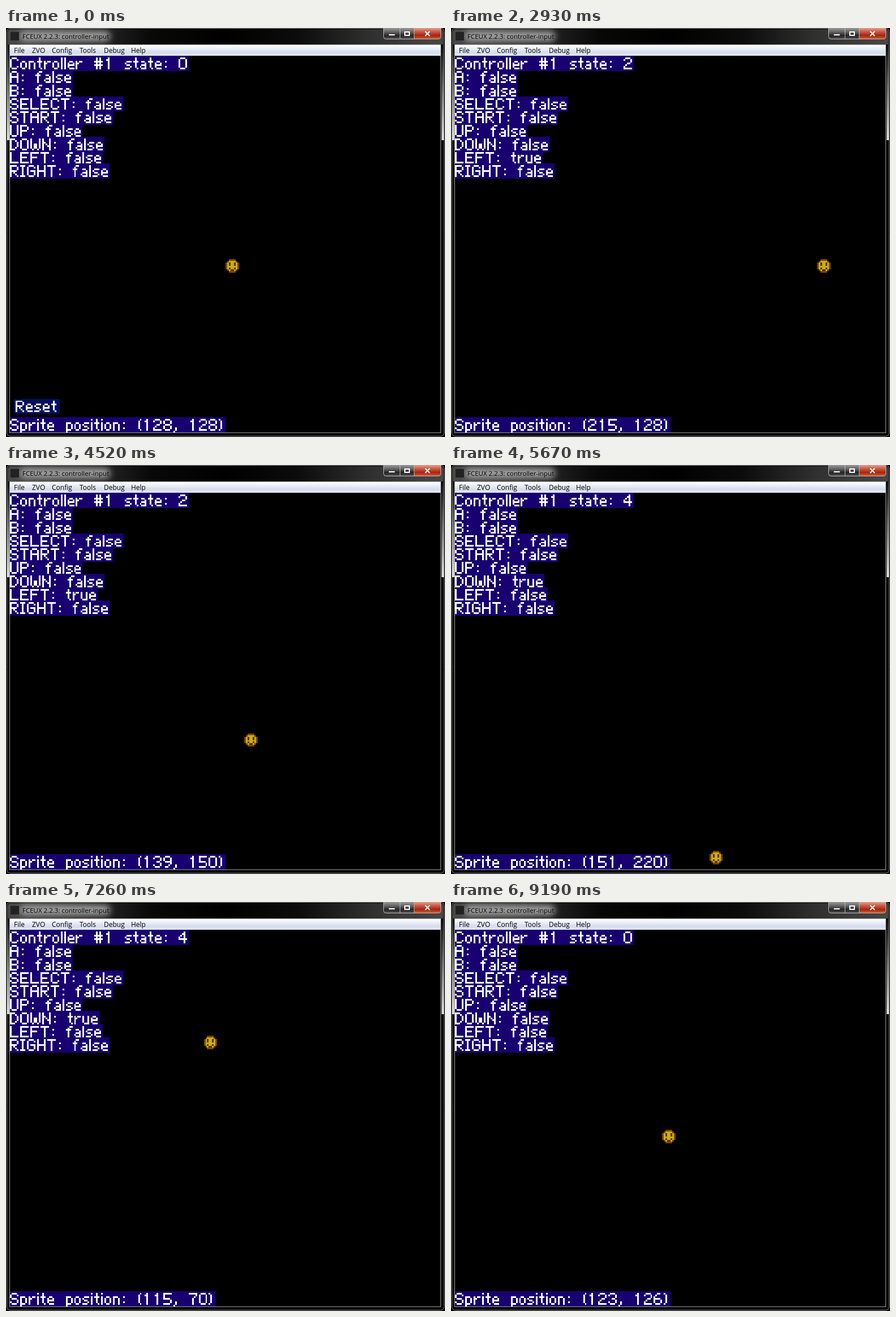
These frames come from a looping animation (776 by 722 pixels, 9220 ms). An HTML page with a canvas:

```html
<!DOCTYPE html>
<html lang="en">
<meta charset="utf-8">
<title>Controller input</title>
<style>
html, body { margin: 0; width: 100%; height: 100%; overflow: hidden; background: #000 }
canvas { display: block }
</style>
<canvas id="stage" width="776" height="722"></canvas>
<script>
const ctx = document.getElementById('stage').getContext('2d');
const LOOP = 9220, RIGHT = 1, LEFT = 2, DOWN = 4, UP = 8;

// Key presses: button, pressed at, released at (ms); the sprite moves 1 unit per 15 ms
const presses = [
  [LEFT, 395, 3890], [UP, 3860, 3920], [DOWN, 3920, 4310], [LEFT, 4340, 4610],
  [DOWN, 4620, 8340], [RIGHT, 4800, 5070], [LEFT, 6490, 7030],
  [RIGHT, 8000, 8555], [UP, 8610, 8850], [LEFT, 8740, 9175]
];

// Console letters: each word is a polyline through x,y grid points
const strokes = {
  A: '0601103041 4146 0343', B: '0006 0030 0333 0636 4142 4445',
  C: '4130100105163645', D: '002031424435260600', E: '40000646 0333',
  F: '400006 0333', G: '41301001051636454323', H: '0006 4046 0343',
  I: '0020 1016 0626', L: '000646', N: '0006 4046 1234',
  O: '103041453616050110', P: '06003041423303', R: '06003041423303 2446',
  S: '413010010213334445361605', T: '0040 2026', U: '000516364540',
  W: '00051625233335465550',
  a: '1222333616051434', e: '043433221203051636', f: '30201116 0222',
  i: '0000 0206', l: '0006', n: '0602223336', o: '122233352616050312',
  p: '07022233352606', r: '0206 132232', s: '3212031424352606',
  t: '101526 0222', u: '0205163632',
  '#': '1016 3036 0242 0444', ':': '1212 1515', ',': '151607',
  '(': '20111526', ')': '00111506',
  0: '103041453616050110', 1: '112026', 2: '0110304142332314050646',
  3: '01103041423323 334445361605', 4: '3630030444', 5: '4000033344453606',
  6: '30200205163645443303', 7: '0040412326',
  8: '103041423313020110 3344453616050413', 9: '4313020110304144352616'
};

const advance = c => c === 'W' ? 7 : 'il'.includes(c) ? 2 : ':,'.includes(c) ? 3
  : 'It()'.includes(c) ? 4 : /[a-z]/.test(c) ? 5 : 6;
const textWidth = s => [...s].reduce((w, c) => w + advance(c), 0);

// Console units to stage pixels
const VIEW = [7, 49, 761, 665];
const sx = x => VIEW[0] + Math.ceil(x * 2.9742);
const sy = y => VIEW[1] + Math.ceil(y * 2.966);
function cell(x, y, w = 1, h = 1) {
  ctx.fillRect(sx(x), sy(y), sx(x + w) - sx(x), sy(y + h) - sy(y));
}

function glyph(c, x, y) {
  for (const line of (strokes[c] || '').split(' ')) {
    for (let i = 0; i + 3 < line.length; i += 2) {
      const [ax, ay, bx, by] = [...line.slice(i, i + 4)].map(Number);
      const n = Math.max(Math.abs(bx - ax), Math.abs(by - ay), 1);
      for (let k = 0; k <= n; k++)
        cell(x + Math.round(ax + (bx - ax) * k / n), y + Math.round(ay + (by - ay) * k / n));
    }
  }
}

function write(s, x, y) {
  ctx.fillStyle = '#fff';
  for (const c of s) {
    glyph(c, x, y);
    x += advance(c);
  }
}

function print(s, x, y) {
  ctx.fillStyle = '#180070';
  cell(x, y - 1, textWidth(s), 9);
  write(s, x, y);
}

function resetButton(alpha) {
  ctx.save();
  ctx.globalAlpha = alpha;
  ctx.translate(1, 0);
  box(sx(2), sy(204), sx(29) - sx(2), sy(213) - sy(204), 2, '#001060');
  write('Reset', 3, 205);
  ctx.restore();
}

function face(x, y) {
  ctx.fillStyle = '#7c4400';
  cell(x + 2, y, 4, 8);
  cell(x + 1, y + 1, 6, 6);
  cell(x, y + 2, 8, 4);
  ctx.fillStyle = '#c8b008';
  cell(x + 2, y + 1, 4, 6);
  cell(x + 1, y + 2, 6, 4);
  ctx.fillStyle = '#5c3000';
  for (const eye of [2, 5]) {
    cell(x + eye, y + 2, 1, 2);
    cell(x + eye, y + 5);
  }
  cell(x + 3, y + 6, 2, 1);
}

function gradient(x0, y0, x1, y1, stops) {
  const g = ctx.createLinearGradient(x0, y0, x1, y1);
  stops.forEach((c, i) => g.addColorStop(i / (stops.length - 1), c));
  return g;
}
const fade = (y0, y1, ...stops) => gradient(0, y0, 0, y1, stops);

function box(x, y, w, h, r, fill, line) {
  ctx.beginPath();
  ctx.roundRect(x, y, w, h, r);
  ctx.fillStyle = fill;
  ctx.fill();
  if (line) {
    ctx.strokeStyle = line;
    ctx.stroke();
  }
}

function label(s, x, y, size, color) {
  ctx.font = size + 'px "Open Sans", sans-serif';
  ctx.fillStyle = color;
  ctx.fillText(s, x, y);
}

function drawWindow() {
  ctx.lineWidth = 1;
  ctx.fillStyle = '#000';
  ctx.fillRect(0, 0, 776, 722);
  box(1.5, .5, 773, 720, 6, '#000', '#909090');
  box(3, 2, 770, 27, [5, 5, 0, 0],
    gradient(3, 0, 773, 0, ['#4a4a4a', '#303030', '#080808', '#000', '#0c0c0c', '#303030', '#484848']));
  ctx.fillStyle = fade(30, 198, '#101010', '#777', '#dcdcdc');
  ctx.fillRect(2, 30, 4, 168);
  ctx.fillRect(770, 30, 4, 168);
  ctx.strokeStyle = '#a0a0a0';
  ctx.strokeRect(6.5, 29.5, 762, 685);

  ctx.filter = 'blur(6px)';
  box(24, 6, 160, 17, 8, '#a4a4a4');
  ctx.filter = 'none';
  box(8, 7, 15, 15, 0, '#222');
  label('FCEUX 2.2.3: controller-input', 29, 19, 11.5, '#000');

  const grey = fade(0, 20, '#999', '#666', '#242424', '#555');
  box(667.5, -.5, 29, 20, [0, 0, 0, 4], grey, '#bbb');
  box(696.5, -.5, 25, 20, 0, grey, '#bbb');
  box(721.5, -.5, 47, 20, [0, 0, 4, 0], fade(0, 20, '#e0a090', '#c85a44', '#a42410', '#d86838'), '#ccb0a8');
  box(676.5, 10.5, 11, 3, 1, '#fff', '#444');
  ctx.strokeStyle = '#fff';
  ctx.lineWidth = 2;
  ctx.strokeRect(705, 7, 8, 6);
  ctx.beginPath();
  ctx.moveTo(741, 6); ctx.lineTo(749, 14);
  ctx.moveTo(749, 6); ctx.lineTo(741, 14);
  ctx.stroke();

  ctx.fillStyle = fade(30, 49, '#fff', '#eceff8', '#d6dcec', '#e2e7f4');
  ctx.fillRect(7, 30, 761, 19);
  const menu = { File: 14, ZVO: 46, Config: 81, Tools: 130, Debug: 173, Help: 221 };
  for (const name in menu) label(name, menu[name], 44, 12, '#000');
}

// Screen refreshes every 30 ms, with two slightly longer gaps
function tick(t) {
  const base = t < 5040 ? 410 : t < 8770 ? 5040 : 8770;
  return base + Math.floor((t - base) / 30) * 30;
}

function drawScreen(t) {
  let x = 128, y = 128, state = 0;
  for (const [key, from, to] of presses) {
    const d = Math.max(0, Math.min(t, to) - from) / 15;
    if (key === LEFT) x -= d;
    if (key === RIGHT) x += d;
    if (key === UP) y -= d;
    if (key === DOWN) y += d;
    if (t >= from && t < to) state |= key;
  }
  x = Math.round(x) & 255;
  y = Math.round(y) & 255;

  ctx.save();
  ctx.beginPath();
  ctx.rect(...VIEW);
  ctx.clip();
  ctx.fillStyle = '#000';
  ctx.fillRect(...VIEW);
  face(x, y - 7);

  print('Controller #1 state: ' + state, 0, 1);
  const buttons = { A: 128, B: 64, SELECT: 32, START: 16, UP, DOWN, LEFT, RIGHT };
  Object.keys(buttons).forEach((name, i) =>
    print(name + ': ' + !!(state & buttons[name]), 0, 9 + 8 * i));
  resetButton(Math.max(0, Math.min(1, (2650 - t) / 500)));
  print(`Sprite position: (${x}, ${y})`, 0, 216);
  ctx.restore();
}

function frame() {
  drawWindow();
  drawScreen(tick(performance.now() % LOOP));
  requestAnimationFrame(frame);
}
frame();
</script>
</html>
```
